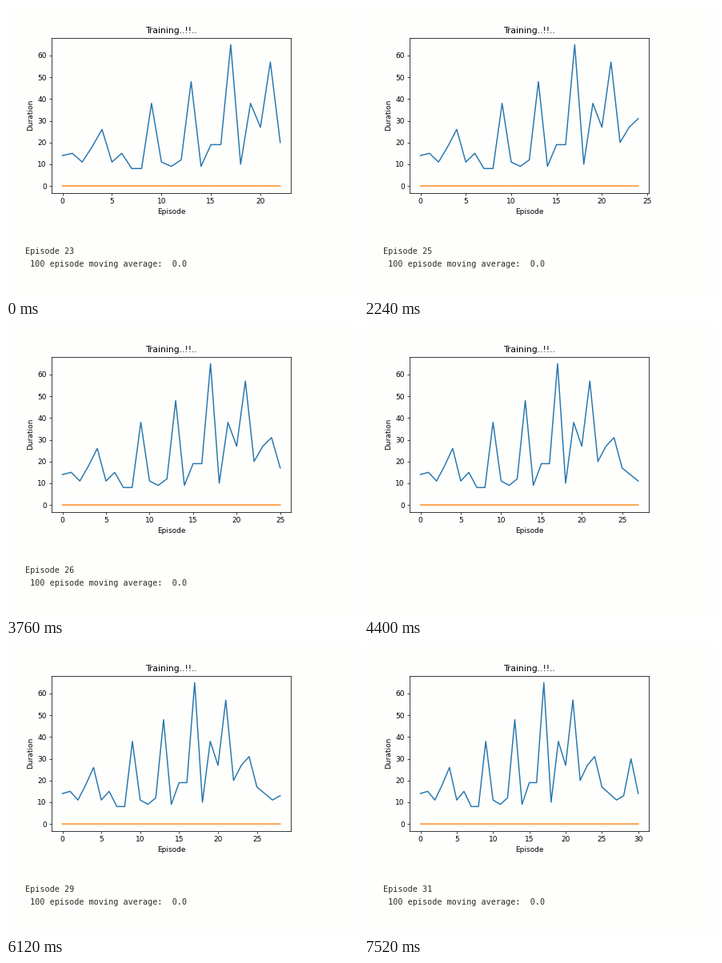
Recreate the animation shown at these times as a matplotlib script. Size 440x364 px, loop 8000 ms.

```python
import matplotlib.pyplot as plt
from matplotlib.animation import FuncAnimation
from matplotlib.ticker import MultipleLocator

WIDTH, HEIGHT, DPI = 440, 364, 64
INTERVAL, LOOP = 40, 8000
PAPER, INK = "#fefefc", "#2a2a26"

DURATIONS = [14, 15, 11, 18, 26, 11, 15, 8, 8, 38, 11, 9, 12, 48, 9, 19,
             19, 65, 10, 38, 27, 57, 20, 27, 31, 17, 14, 11, 13, 30, 14]
FIRST_EPISODE = 23
# Moments (ms) at which one more episode finishes.
UPDATES = [680, 1960, 2720, 3800, 4400, 5000, 6200, 6880]
# The printed lines blank out for one tick at these redraws.
BLANKS = {1960, 4400}

plt.rcParams.update({
    "font.family": "DejaVu Sans",
    "font.size": 10.2,
    "axes.titlesize": 12.3,
    "axes.linewidth": 0.85,
    "lines.linewidth": 1.65,
})

fig = plt.figure(figsize=(WIDTH / DPI, HEIGHT / DPI), dpi=DPI, facecolor=PAPER)


def pixel_axes(left, top, right, bottom):
    return fig.add_axes([left / WIDTH, 1 - bottom / HEIGHT,
                         (right - left) / WIDTH, (bottom - top) / HEIGHT],
                        facecolor=PAPER)


def console_line(y, text=""):
    return fig.text(24 / WIDTH, 1 - y / HEIGHT, text, color=INK, size=11.4,
                    family="DejaVu Sans Mono", va="baseline")


ax = pixel_axes(56.9, 39.55, 356.4, 233.9)
ax.set_title("Training..!!..")
ax.set_xlabel("Episode")
ax.set_ylabel("Duration")
ax.xaxis.set_major_locator(MultipleLocator(5))
ax.yaxis.set_major_locator(MultipleLocator(10))
peak = max(DURATIONS)
ax.set_ylim(-0.05 * peak, 1.05 * peak)

duration_line, = ax.plot([], [], color="#2676ad")
average_line, = ax.plot([], [], color="#ff8a1c", snap=False)
episode_text = console_line(310.5)
average_text = console_line(326.5, " 100 episode moving average:  0.0")


def update(frame):
    now = frame * INTERVAL
    count = FIRST_EPISODE + sum(now >= t for t in UPDATES)
    episodes = range(count)
    duration_line.set_data(episodes, DURATIONS[:count])
    average_line.set_data(episodes, [0] * count)
    margin = 0.05 * (count - 1)
    ax.set_xlim(-margin, count - 1 + margin)

    episode_text.set_text(f"Episode {count}")
    for line in (episode_text, average_text):
        line.set_visible(now not in BLANKS)
    return duration_line, average_line, episode_text, average_text


animation = FuncAnimation(fig, update, frames=LOOP // INTERVAL,
                          interval=INTERVAL, repeat=True, repeat_delay=0,
                          blit=False)
plt.show()
```
